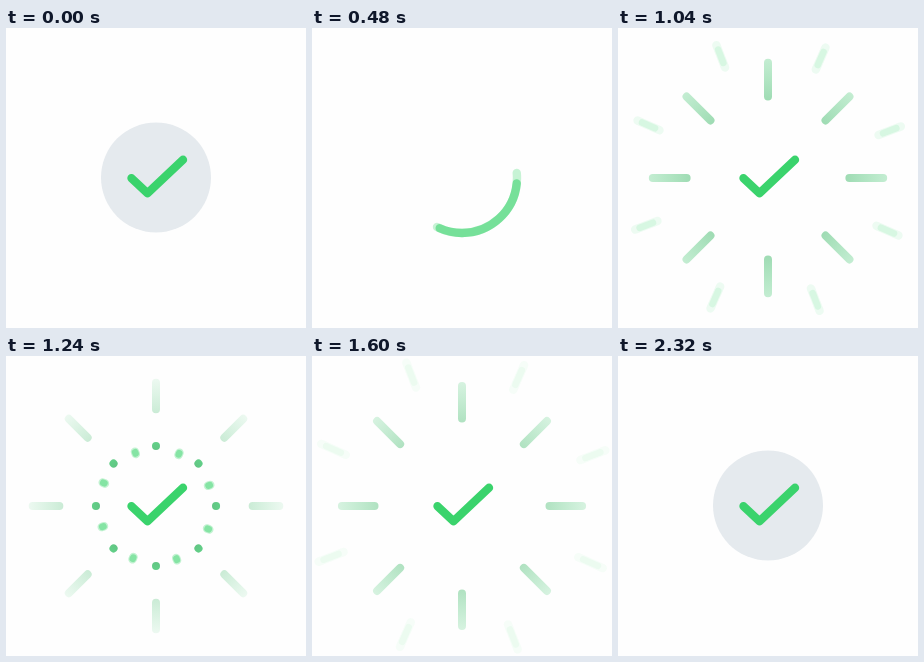
Animation, 300 px wide and 300 px high, one loop 2.48 s. Source, as an HTML page with a canvas:

```html
<!DOCTYPE html>
<html lang="en">
<head>
<meta charset="utf-8">
<style>
  html, body { margin: 0; height: 100%; overflow: hidden; background: #fefefe; }
  canvas { display: block; width: 300px; height: 300px; }
</style>
</head>
<body>
<canvas id="stage" width="300" height="300"></canvas>
<script>
const ctx = document.getElementById('stage').getContext('2d');
const LOOP = 2480, STEP = 40, CENTER = 150;
const SPIN_START = 200, SPIN_END = 770, BURSTS = [760, 1240], DISC_START = 1760;
const GREEN = '#3ad36c';
const CHECK = 'L141.5 165.2L177 131.8';
const check = new Path2D('M125.5 150.2' + CHECK);
// One and a bit turns counter-clockwise, curling in to become the check mark
const swirl = new Path2D('M150 95A55 55 0 0 0 150 205A55 55 0 0 0 150 95' +
  'A55 55 0 0 0 119.5 104C102 116 111 135 125.5 150.2' + CHECK);
const SWIRL_LENGTH = 503, CURL_LENGTH = 430;

const clamp = x => Math.min(Math.max(x, 0), 1);
const smooth = x => x * x * (3 - 2 * x);
const easeOut = (x, power) => 1 - (1 - x) ** power;

function trimmed(from, to, alpha) {
  if (to <= from) return;
  ctx.globalAlpha = alpha;
  ctx.setLineDash([to - from, 2000]);
  ctx.lineDashOffset = -from;
  ctx.stroke(swirl);
  ctx.setLineDash([]);
}

function drawSwirl(t) {
  const u = (t - 160) / (SPIN_END - 160);
  const head = SWIRL_LENGTH * u;
  const tail = CURL_LENGTH * smooth(clamp((t - 280) / 510));
  const alpha = 0.55 + 0.3 * u;
  trimmed(tail, head, alpha * 0.4);
  trimmed(tail + 3, head - 16 * (1 - u) - 3, alpha * 0.8);
}

function rays(angle, inner, outer, alpha, width) {
  ctx.globalAlpha = alpha;
  ctx.lineWidth = width;
  ctx.beginPath();
  for (let i = 0; i < 8; i++) {
    const a = angle + i * Math.PI / 4, x = Math.sin(a), y = -Math.cos(a);
    ctx.moveTo(CENTER + x * inner, CENTER + y * inner);
    ctx.lineTo(CENTER + x * outer, CENTER + y * outer);
  }
  ctx.stroke();
}

function drawBurst(age) {
  if (age < 0 || age >= 720) return;
  // Long rays: the inner end moves steadily, the outer end shoots ahead
  const a = age / 720;
  const inner = 60 + 55 * a, outer = 60.1 + 64 * easeOut(a, 4);
  const shade = ctx.createRadialGradient(CENTER, CENTER, inner - 4, CENTER, CENTER, outer + 4);
  shade.addColorStop(0, '#46bb6e');
  shade.addColorStop(1, `rgba(70, 200, 115, ${1 - a})`);
  ctx.strokeStyle = shade;
  rays(0, inner, outer, 0.85 * (1 - a), 8);

  // Faint rays between them fly off the stage
  const b = clamp(age / 480), fly = easeOut(b, 2);
  const far = 57 + 89 * fly, half = 1.2 + 13 * fly, fade = 0.75 * (1 - b) ** 1.5;
  ctx.strokeStyle = GREEN;
  rays(0.415, far - half, far + half, fade * 0.4, 8.5);
  rays(0.415, far - half * 0.6, far + half * 0.6, fade * 0.6, 6.5);
}

function drawDisc(t) {
  const p = t < SPIN_START ? 1 : clamp((t - DISC_START) / 500);
  ctx.globalAlpha = 1;
  ctx.fillStyle = '#e5eaee';
  ctx.beginPath();
  ctx.arc(CENTER, CENTER - 0.5, 55 * easeOut(p, 3), 0, 2 * Math.PI);
  ctx.fill();
}

function draw(t) {
  ctx.globalAlpha = 1;
  ctx.fillStyle = '#fefefe';
  ctx.fillRect(0, 0, 300, 300);
  ctx.lineCap = ctx.lineJoin = 'round';
  drawDisc(t);
  BURSTS.forEach(start => drawBurst(t - start));
  ctx.strokeStyle = GREEN;
  ctx.lineWidth = 8.4;
  ctx.globalAlpha = 1;
  if (t >= SPIN_START && t < SPIN_END) drawSwirl(t);
  else ctx.stroke(check);
}

const start = performance.now();
function tick() {
  const t = (performance.now() - start) % LOOP;
  draw(Math.floor(t / STEP) * STEP);
  requestAnimationFrame(tick);
}
tick();
</script>
</body>
</html>
```
